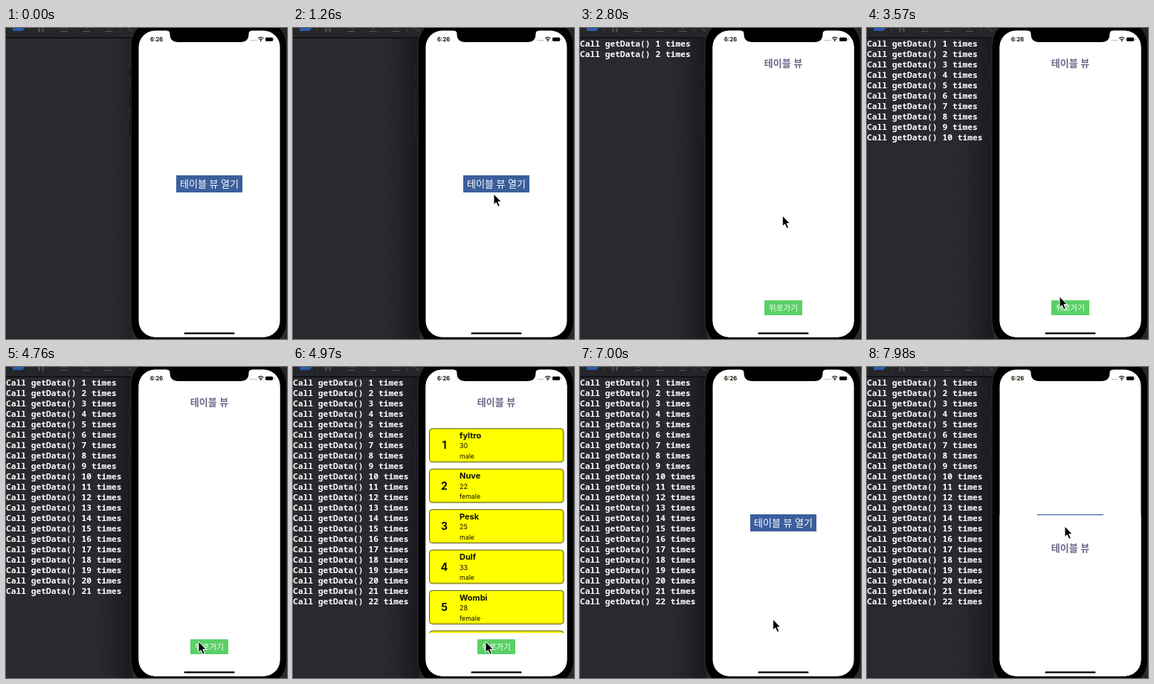
These frames come from a looping animation (378x418 px, 8000 ms). An HTML page:

```html
<!DOCTYPE html>
<html lang="ko">
<head>
<meta charset="utf-8">
<title>Table view</title>
<style>
  html, body { margin: 0; width: 100%; height: 100%; overflow: hidden; background: #292a2f; }
  svg { display: block; width: 378px; height: 418px; }
  text { white-space: pre; }
  .ko { font-family: "Noto Sans CJK KR", "Noto Sans KR", "Noto Sans CJK", sans-serif; text-anchor: middle; }
  .log { font: 700 11.28px "Noto Sans Mono", "DejaVu Sans Mono", monospace; fill: #fff; }
  .ui { font-family: Inter, "Liberation Sans", sans-serif; fill: #111100; }
</style>
</head>
<body>
<svg viewBox="0 0 378 418" xmlns="http://www.w3.org/2000/svg">
  <defs>
    <linearGradient id="shade">
      <stop offset="0" stop-color="#17181c" stop-opacity="0"/>
      <stop offset="1" stop-color="#17181c" stop-opacity=".75"/>
    </linearGradient>
    <clipPath id="screen"><rect x="178.5" y="3.5" width="190" height="412" rx="22"/></clipPath>
    <clipPath id="list"><rect x="178" y="78" width="191" height="279.5"/></clipPath>
  </defs>

  <rect width="378" height="418" fill="#292a2f"/>
  <rect width="378" height="13" fill="#252629"/>
  <rect y="12.5" width="378" height="1.5" fill="#0c0c0e"/>
  <path d="M9 -2H22L25 1L22 4H9Z" fill="#2c5ba8"/>
  <g fill="none" stroke="#55565a">
    <path d="M32.5 0V6M153.5 0V6" stroke="#3c3d41"/>
    <path d="M44.5 0V5.5M49.5 0V5.5" stroke-width="2"/>
    <path d="M73 4.5H83M75 1Q79 -2 82 2M103 4.5H113M108 -1V2M133 4.5H143M138 -1V2M164 0L167 4L170 3"/>
  </g>

  <rect x="146" y="14" width="24" height="404" fill="url(#shade)" opacity=".6"/>
  <rect id="focus" x="122" y="14" width="48" height="404" fill="url(#shade)"/>
  <g id="log"></g>

  <path d="M165 52h4v15h-4zM165 82h4v27h-4zM165 118h4v28h-4z" fill="#141416" stroke="#38393d" stroke-width=".7"/>
  <rect x="168" y="-11" width="209.5" height="440" rx="34" fill="#000" stroke="#303134"/>
  <g clip-path="url(#screen)">
    <rect x="178" y="3" width="191" height="413" fill="#fff"/>
    <rect x="229" y="198" width="89" height="23" fill="#3b5f9c"/>
    <text class="ko" x="273.5" y="214.3" font-size="13" fill="#fff">테이블 뷰 열기</text>
    <g id="sheet">
      <rect x="178" y="3.5" width="191" height="413" fill="#fff"/>
      <text class="ko" x="273.5" y="52" font-size="13" font-weight="700" fill="#6c6788">테이블 뷰</text>
      <g id="rows" clip-path="url(#list)"></g>
      <rect x="248" y="366" width="51" height="20" fill="#5ad067"/>
      <text class="ko" x="273.5" y="380" font-size="10.6" font-weight="500" fill="#fff">뒤로가기</text>
    </g>
  </g>
  <path d="M216 2H331V3.5Q326.500 3.500 326.500 8Q326.500 19 315 19H232Q220.500 19 220.500 8Q220.500 3.500 216 3.500Z"/>
  <text class="ui" x="194" y="18" font-size="7.6" font-weight="700">6:26</text>
  <path d="M329 16.500H337" stroke="#888" stroke-width="1.200" stroke-dasharray="1.200 1.100"/>
  <g fill="none" stroke="#111" stroke-width="1.300">
    <path d="M339.200 14Q342.700 10.700 346.200 14M340.800 15.700Q342.700 14 344.600 15.700"/>
  </g>
  <circle cx="342.700" cy="17.200" r=".9"/>
  <rect x="349" y="12.800" width="10" height="5" rx="1.200"/>
  <path d="M360.300 14.300v2" stroke="#777"/>
  <rect x="239.500" y="409.200" width="68" height="2.400" rx="1.200"/>

  <path id="cursor" d="M0 0V14.500L3.300 11.600L5.800 17.300L8.300 16.200L5.900 10.600H10.300Z" stroke="#fff" stroke-width="1" stroke-linejoin="round"/>
</svg>
<script>
const LOOP = 8000, STEP = 70, TRAVEL = 412;
const OPEN = 2020, CLOSE = 6503, REOPEN = 7870, LOADED = 4970;
const $ = id => document.getElementById(id);

const people = [
  ["fyltro", 30, "male"], ["Nuve", 22, "female"], ["Pesk", 25, "male"],
  ["Dulf", 33, "male"], ["Wombi", 28, "female"], ["", "", ""]
];
$("rows").innerHTML = people.map(([name, age, sex], i) => `
  <g transform="translate(0 ${82.8 + i * 54.4})" class="ui">
    <rect x="183.5" width="180.5" height="45" rx="4" fill="#ff0" stroke="#55551c"/>
    <path d="M185 43.300H362.300V2" fill="none" stroke="#dede18"/>
    <text x="203.500" y="27.500" font-size="14" font-weight="700" text-anchor="middle">${i + 1}</text>
    <text x="224" y="13.200" font-size="11" font-weight="700">${name}</text>
    <text x="224" y="26.700" font-size="9">${age}</text>
    <text x="224" y="40.300" font-size="8.800">${sex}</text>
  </g>`).join("");

// when each console line is printed
const printed = [2520, 2730, 2870, 2940, 3080, 3220, 3360, 3430, 3570, 3570, 3640,
  3780, 3990, 4130, 4130, 4340, 4340, 4410, 4620, 4690, 4760, 4900];
$("log").innerHTML = printed.map((_, i) =>
  `<text class="log" x="0" y="${25 + i * 14}">Call getData() ${i + 1} times</text>`).join("");
const lines = [...$("log").children];

// time, x, y of the pointer tip
const path = [
  [0, 318, 440], [420, 276, 273], [560, 276, 273], [840, 270, 223], [1610, 270, 223],
  [1820, 277, 214], [2660, 277, 214], [3080, 259, 361], [4550, 259, 361], [4760, 259, 369],
  [6860, 259, 369], [7350, 262, 218], [7560, 266, 214], [8000, 266, 214]
];

const clamp = v => Math.min(1, Math.max(0, v));
const ease = p => p * p * (3 - 2 * p);
const spring = ms => (1 + ms * .016) * Math.exp(-ms * .016);
const show = (el, on) => el.setAttribute("visibility", on ? "inherit" : "hidden");
const move = (el, x, y) => el.setAttribute("transform", `translate(${x.toFixed(2)} ${y.toFixed(2)})`);

function pointer(t) {
  const i = path.findIndex(p => p[0] > t);
  const [t0, x0, y0] = path[i - 1], [t1, x1, y1] = path[i];
  const p = ease((t - t0) / (t1 - t0));
  return [x0 + (x1 - x0) * p, y0 + (y1 - y0) * p];
}

function sheetOffset(t) {
  if (t < OPEN) return TRAVEL;
  if (t < CLOSE) return TRAVEL * spring(t - OPEN);
  if (t < REOPEN) return TRAVEL * (1 - spring(t - CLOSE));
  return TRAVEL * spring(t - REOPEN);
}

function render(t) {
  move($("cursor"), ...pointer(t));
  move($("sheet"), 0, sheetOffset(t));
  show($("rows"), t >= LOADED && t < REOPEN);
  $("focus").setAttribute("opacity", clamp((t - 70) / 280));
  lines.forEach((line, i) => show(line, t >= printed[i]));
}

const start = performance.now();
function tick() {
  const t = (performance.now() - start) % LOOP;
  render(Math.floor(t / STEP) * STEP);
  requestAnimationFrame(tick);
}
tick();
</script>
</body>
</html>
```
